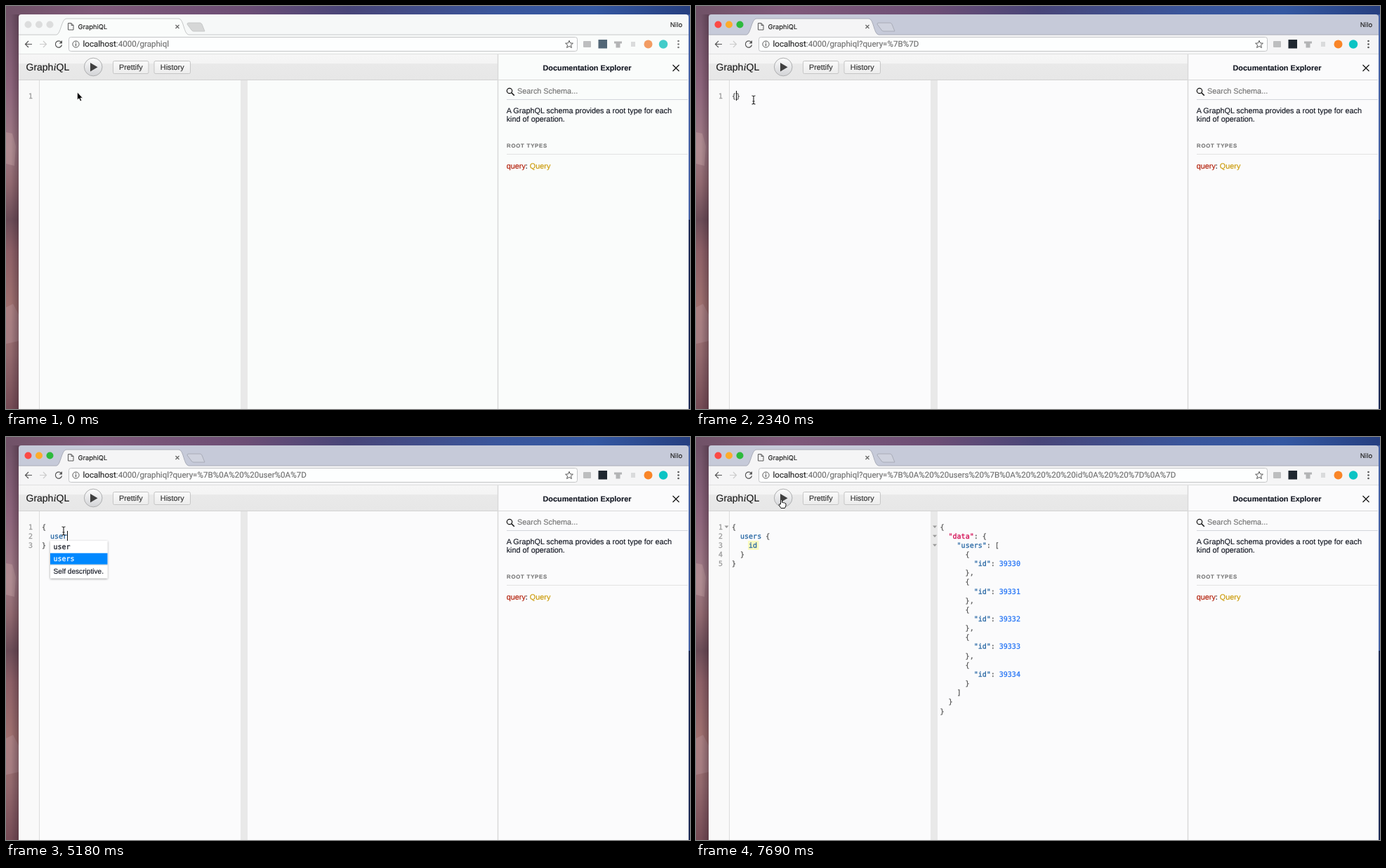
Recreate the animation shown at these times as an HTML page. Size 974 px wide and 575 px high, loop 8 s.

```html
<!DOCTYPE html>
<html lang="en">
<head>
<meta charset="utf-8">
<title>GraphiQL</title>
<style>
html, body { margin: 0; width: 100%; height: 100%; overflow: hidden; }
svg { display: block; font: 10.85px "Liberation Sans", Arial, sans-serif; }
text { white-space: pre; text-rendering: geometricPrecision; fill: currentColor; stroke: currentColor; stroke-width: .15; }
.ui { font-family: Inter, sans-serif; font-size: 9.36px; }
.url { font-family: Roboto, sans-serif; font-size: 11.58px; }
.mono { font-family: "DejaVu Sans Mono", monospace; font-size: 10px; stroke-width: .25; }
.line { fill: none; stroke-width: 1.2; }
.thin { fill: none; stroke-width: 1; }
svg { --strip: #c6cad9; --bar: #f5f5f6; --page: #fbfbfc; --edge: #a9acb8; --plus: #cfd2de;
  --red: #fc4a45; --amber: #fdac2b; --green: #2cba3d; --dark: #1f2730; --orange: #f98528; --teal: #0bc4c4; --icon: #555; }
svg.idle { --strip: #f6f8f8; --bar: #fafcfb; --page: #fafcfb; --edge: #c6c8c8; --plus: #d6d7d7;
  --red: #dcdddd; --amber: #dcdddd; --green: #dcdddd; --dark: #536777; --orange: #f29c63; --teal: #42ccc9; --icon: #777; }
</style>
</head>
<body>
<svg id="stage" width="974" height="575" viewBox="0 0 974 575">
  <defs>
    <linearGradient id="sky">
      <stop offset="0" stop-color="#705267"/><stop offset=".13" stop-color="#80597a"/>
      <stop offset=".35" stop-color="#6c4e75"/><stop offset=".5" stop-color="#484578"/>
      <stop offset=".72" stop-color="#3a569c"/><stop offset=".86" stop-color="#3458a2"/>
      <stop offset="1" stop-color="#263f80"/>
    </linearGradient>
    <linearGradient id="rock" x2="0" y2="1">
      <stop offset="0" stop-color="#705267"/><stop offset=".18" stop-color="#8b637a"/>
      <stop offset=".34" stop-color="#a17c86"/><stop offset=".43" stop-color="#90686f"/>
      <stop offset=".52" stop-color="#6b4c57"/><stop offset=".6" stop-color="#8c5f66"/>
      <stop offset=".75" stop-color="#a0716f"/><stop offset=".86" stop-color="#93696d"/>
      <stop offset="1" stop-color="#754b55"/>
    </linearGradient>
    <linearGradient id="edge">
      <stop offset=".4" stop-color="#301c28" stop-opacity="0"/><stop offset="1" stop-color="#301c28" stop-opacity=".35"/>
    </linearGradient>
    <linearGradient id="top" x2="0" y2="1">
      <stop offset="0" stop-color="#f6f6f6"/><stop offset=".34" stop-color="#f4f4f4"/>
      <stop offset=".37" stop-color="#e9e9e9"/><stop offset="1" stop-color="#e7e7e7"/>
    </linearGradient>
    <linearGradient id="button" x2="0" y2="1">
      <stop offset="0" stop-color="#fafafa"/><stop offset="1" stop-color="#ececec"/>
    </linearGradient>
    <linearGradient id="round" x2="0" y2="1">
      <stop offset="0" stop-color="#fdfdfd"/><stop offset="1" stop-color="#d2d3d6"/>
    </linearGradient>
    <filter id="shade" x="-20%" y="-20%" width="140%" height="150%">
      <feDropShadow dx="0" dy="1" stdDeviation="1.5" flood-opacity=".4"/>
    </filter>
  </defs>

  <!-- desktop -->
  <rect width="974" height="575" fill="url(#sky)"/>
  <rect y="12" width="18" height="563" fill="url(#rock)"/>
  <path d="M0 180L9 182 14 200 12 228 0 225Z" fill="#b9969a" opacity=".6"/>
  <path d="M0 430L10 425 18 440V478L0 482Z" fill="#b48e94" opacity=".5"/>
  <rect y="12" width="18" height="563" fill="url(#edge)"/>
  <rect x="971" y="12" width="3" height="293" fill="#4663a6"/>
  <rect x="971" y="305" width="3" height="270" fill="#1f2d58"/>

  <!-- browser window -->
  <path d="M18 575V16q0-4 4-4H968q4 0 4 4V575Z" fill="var(--strip)"/>
  <path d="M18 41H72C78 40 79 18 86 18H246C253 18 253 40 260 41H972V69H18Z" fill="var(--bar)"/>
  <path d="M18 41H72C78 40 79 18 86 18H246C253 18 253 40 260 41H972" fill="none" stroke="var(--edge)"/>
  <path d="M260 24H276Q278 24 279 26L283 36H267Q265 36 264 34L258 26Q258 24 260 24Z" fill="var(--plus)" stroke="var(--edge)"/>
  <circle cx="31.5" cy="26.5" r="5" fill="var(--red)"/>
  <circle cx="47" cy="26.5" r="5" fill="var(--amber)"/>
  <circle cx="62.5" cy="26.5" r="5" fill="var(--green)"/>
  <path d="M88.5 24.5h4.5l3 3v6.500h-7.500zM93 24.5v3h3" class="thin" stroke="#555"/>
  <text x="102.5" y="32.5" class="ui" color="#222">GraphiQL</text>
  <path d="M241.5 27l5 5m0-5l-5 5" class="line" stroke="#666"/>
  <text x="963" y="30" class="ui" text-anchor="end" color="#222">Nilo</text>
  <path d="M37 54.5H27.5m4.5-4.5l-4.5 4.5 4.5 4.5" class="line" stroke="#555"/>
  <path d="M48 54.5h9.5m-4.5-4.5l4.5 4.5-4.5 4.5" class="line" stroke="#ccc"/>
  <path d="M78.5 51.5A4.6 4.6 0 1 0 79.5 55.5" class="line" stroke="#555"/>
  <path d="M80 49v4.5h-4.5z" fill="#555"/>
  <rect x="89.5" y="44.5" width="724" height="20" rx="3" fill="#fdfefe" stroke="#c4c5c7"/>
  <circle cx="99.5" cy="54.5" r="4.6" class="thin" stroke="#555"/>
  <path d="M99.5 53.5v3.7M99.5 51.3v1.2" class="line" stroke="#555"/>
  <path d="M802 49.3l1.5 3.6 3.9.3-3 2.5 1 3.8-3.4-2.1-3.4 2.1 1-3.8-3-2.5 3.9-.3z" class="thin" stroke="#555"/>
  <rect x="822" y="50" width="11" height="9" rx="1" fill="#bdbebf"/>
  <rect x="843.5" y="48" width="12.5" height="12.5" fill="var(--dark)"/>
  <path d="M866 50.5h11v3h-2.5v6h-6v-6H866z" fill="#b3b4b5"/>
  <rect x="890" y="51" width="6" height="7" fill="#dadbdc"/>
  <circle cx="914.5" cy="54.5" r="6" fill="var(--orange)"/>
  <circle cx="936" cy="54.5" r="6.2" fill="var(--teal)"/>
  <g fill="var(--icon)"><circle cx="957.5" cy="50" r="1.3"/><circle cx="957.5" cy="54.5" r="1.3"/><circle cx="957.5" cy="59" r="1.3"/></g>

  <!-- page -->
  <rect x="18" y="68" width="954" height="507" fill="var(--page)"/>
  <path d="M18 68.5H972" stroke="#dfe0e0"/>
  <rect x="18" y="69" width="682" height="37" fill="url(#top)"/>
  <path d="M18 105.5H700" stroke="#d2d2d2"/>
  <text x="28.5" y="92" font-size="14" color="#1a1a1a">Graph<tspan font-family="Liberation Serif, serif" font-style="italic" font-size="14.8">i</tspan>QL</text>
  <circle cx="124.2" cy="87" r="12.8" fill="url(#round)" stroke="#adaeaf"/>
  <path d="M120 81V93.5L130.5 87.25Z" fill="#404040"/>
  <g fill="url(#button)" stroke="#c5c5c5">
    <rect x="152.5" y="78.5" width="50.5" height="18" rx="2"/>
    <rect x="211" y="78.5" width="51.5" height="18" rx="2"/>
  </g>
  <g text-anchor="middle" color="#333"><text x="177.8" y="90.5">Prettify</text><text x="236.7" y="90.5">History</text></g>
  <rect x="18" y="106" width="29" height="469" fill="#f9f9f9"/>
  <path d="M47.5 106V575" stroke="#dcdcdc"/>
  <rect x="334" y="106" width="10" height="469" fill="#e9e9e9"/>

  <!-- documentation panel -->
  <path d="M700.5 69V575" stroke="#d9d9d9" stroke-width="1.5"/>
  <text x="827.5" y="92" font-weight="bold" text-anchor="middle" color="#141823">Documentation Explorer</text>
  <path d="M949.5 84l9 9m0-9l-9 9" class="line" stroke="#111"/>
  <path d="M701 105.5H971" stroke="#d8d8d8"/>
  <circle cx="717" cy="121" r="3.7" class="line" stroke="#111"/>
  <path d="M719.8 123.8l4 4" stroke="#111" stroke-width="1.6"/>
  <text x="728" y="124.5" color="#757575">Search Schema...</text>
  <path d="M713 133.5H971" stroke="#d3d6db"/>
  <g color="#141823"><text x="712.7" y="153">A GraphQL schema provides a root type for each</text><text x="712.7" y="165">kind of operation.</text></g>
  <text x="713" y="201.5" font-size="7.8" font-weight="bold" letter-spacing=".78" color="#777">ROOT TYPES</text>
  <path d="M713 211.5H971" stroke="#e2e2e2"/>
  <text x="712.7" y="232" color="#141823"><tspan color="#b11a04">query</tspan>: <tspan color="#ca9800">Query</tspan></text>

  <g id="live"></g>
</svg>
<script>
const LOOP = 8000, PITCH = 13.15, BASE = 131.5, CHAR = 6.02;
const stage = document.getElementById('stage'), live = document.getElementById('live');

const block = word => `{\n  ${word}\n}`;
const full = '{\n  users {\n    id\n  }\n}';
const users = Array.from({ length: 5 }, (_, i) => ({ id: 39330 + i }));
const answer = JSON.stringify({ data: { users } }, null, 2);

// Each entry changes part of the state from its time on; caret is [column, row].
const steps = [
  [0, { idle: true, mouse: ['arrow', 101.5, 123], caret: null, query: '', url: '', popup: '', result: '', folds: false }],
  [150, { idle: false }],
  [380, { mouse: ['arrow', 100.5, 123] }],
  [680, { mouse: ['beam', 95, 131] }],
  [850, { mouse: ['beam', 82, 134] }],
  [1000, { caret: [0, 0] }],
  [1600, { caret: null }],
  [2050, { caret: [0, 0] }],
  [2190, { query: '{}', caret: [1, 0] }],
  [2340, { url: '{}' }],
  [2790, { caret: null }],
  [3090, { query: block(''), caret: [2, 1] }],
  [3240, { url: block('') }],
  [3540, { caret: null }],
  [3990, { query: block('us'), caret: [4, 1], popup: 'user' }],
  [4140, { query: block('use'), caret: [5, 1] }],
  [4280, { query: block('user'), caret: [6, 1] }],
  [4430, { url: block('user') }],
  [4880, { caret: null }],
  [5180, { caret: [6, 1], popup: 'users' }],
  [5620, { caret: null }],
  [5770, { query: block('users'), caret: [7, 1], popup: '' }],
  [5910, { url: block('users') }],
  [6360, { caret: null, mouse: ['beam', 100.5, 110] }],
  [6500, { mouse: ['arrow', 114, 82] }],
  [6650, { mouse: ['arrow', 119, 67] }],
  [6800, { mouse: ['hand', 123, 90] }],
  [6950, { mouse: ['hand', 123, 95], caret: [7, 1] }],
  [7250, { query: full, caret: null }],
  [7400, { url: full }],
  [7540, { result: answer }],
  [7690, { folds: true }]
];

const pointers = {
  arrow: '<path d="M0 0V11L2.5 8.8 4.3 12.8 6.2 12 4.5 8.2H7.8Z" fill="#000" stroke="#fff" stroke-width=".7"/>',
  beam: '<path d="M-2.5-6Q0-6 0-4.5V4.5Q0 6-2.5 6M2.5-6Q0-6 0-4.5M0 4.5Q0 6 2.5 6M-1.5 2H1.5" fill="none" stroke="#222" stroke-width="1.1"/>',
  hand: '<path d="M-2.5 1V-5Q-1.5-7-.5-5V-1.5Q1-2.5 1.7-1 3-2 3.6-.5 5-1 5 1V3L3.5 6.5H-2L-5 2Q-5 0-2.5 1Z" fill="#fff" stroke="#111"/>'
};

const rect = (x, y, w, h, fill, extra = '') => `<rect x="${x}" y="${y}" width="${w}" height="${h}" fill="${fill}" ${extra}/>`;
const text = (x, y, body, color, extra = '') => `<text x="${x}" y="${y}" color="${color}" ${extra}>${body}</text>`;
const mono = (x, y, body, color, extra = '') => text(x, y, body, color, 'class="mono" ' + extra);
const note = (x, body, color) => text(x, 194.8, body, color, 'font-size="10.15"');
const fold = (x, row) => `<path d="M${x - 3} ${126.5 + row * PITCH}h6l-3 3.5z" fill="#999"/>`;

const tint = line => line.replace(/("data")|("?[a-z]+"?)|\d+/g, (word, root, name) =>
  `<tspan color="${root ? '#d2054e' : name ? '#1f61a0' : '#2172f5'}">${word}</tspan>`);
const code = (x, source) => source.split('\n').map((line, i) => mono(x, BASE + i * PITCH, tint(line), '#555')).join('');

function popup(choice) {
  const first = choice === 'user', width = first ? 108 : 81.5;
  const item = (word, y) => word === choice
    ? rect(63, y, width, 16, '#08f') + mono(67.5, y + 11.2, word, '#fff')
    : mono(67.5, y + 11.2, word, '#141823');
  return rect(63, 148, width, 53.5, '#fff', 'filter="url(#shade)"') +
    item('user', 148.7) + item('users', 165.7) +
    rect(63, 182, width, .8, '#c8c8c8') +
    (first ? note(67.5, 'User', '#ca9800') : '') +
    note(first ? 94 : 67.5, 'Self descriptive.', '#141823');
}

function draw(s) {
  stage.classList.toggle('idle', s.idle);
  const search = s.url && '?query=' + encodeURIComponent(s.url);
  const [shape, x, y] = s.mouse;
  live.innerHTML =
    text(109.5, 58.4, `localhost<tspan color="#707070">:4000/graphiql${search}</tspan>`, '#222', 'class="url"') +
    s.query.split('\n').map((_, i) => mono(38, BASE + i * PITCH, i + 1, '#999', 'text-anchor="end"')).join('') +
    (s.query === full ? rect(74, 148, 15.5, 13, '#fafac0') : '') +
    code(51, s.query) + code(347.5, s.result) +
    (s.folds ? fold(43.5, 0) + [0, 1, 2].map(row => fold(340, row)).join('') : '') +
    (s.caret ? rect(51 + Math.round(s.caret[0] * CHAR), 121 + s.caret[1] * 13, 1, 14, '#111') : '') +
    (s.popup && popup(s.popup)) +
    `<g transform="translate(${x} ${y})">${pointers[shape]}</g>`;
}

let shown = 0;
const start = performance.now();
function tick() {
  const t = (performance.now() - start) % LOOP;
  const past = steps.filter(([at]) => at <= t);
  if (past.length !== shown) {
    shown = past.length;
    draw(Object.assign({}, ...past.map(step => step[1])));
  }
  requestAnimationFrame(tick);
}
tick();
</script>
</body>
</html>
```
